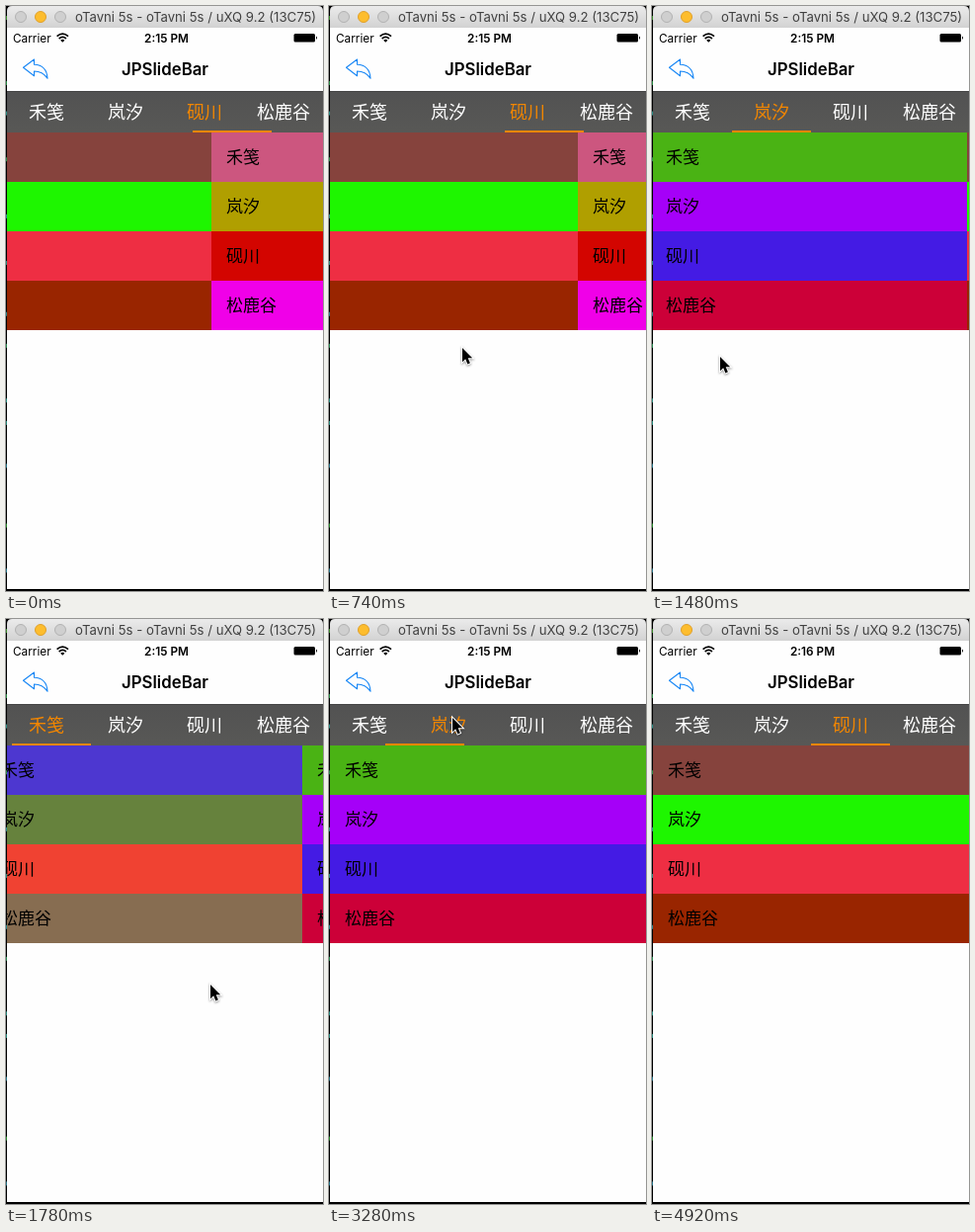
An HTML page that plays this animation: 321x592 px, repeating every 5210 ms.

```html
<!DOCTYPE html>
<html lang="zh-CN">
<head>
<meta charset="utf-8">
<title>JPSlideBar</title>
<style>
  html, body { margin: 0; width: 100%; height: 100%; overflow: hidden; background: #000; }
  svg { display: block; width: 321px; height: 592px; font-family: Inter, "Noto Sans CJK SC", "Noto Sans CJK", sans-serif; }
  .zh { font-family: "Noto Sans CJK SC", "Noto Sans CJK", sans-serif; }
  #tabs text { font-size: 18px; font-weight: 350; text-anchor: middle; fill: #fff; }
  #tabs text.on { fill: #f28600; }
  #pages text { font-size: 17px; }
  #cursor { stroke: #fff; stroke-width: 2; paint-order: stroke; filter: drop-shadow(0 1px 1px #0006); }
</style>
</head>
<body>
<svg viewBox="0 0 321 592">
  <defs>
    <linearGradient id="chrome" x2="0" y2="1">
      <stop stop-color="#ebebeb"/><stop offset="1" stop-color="#d2d2d2"/>
    </linearGradient>
    <linearGradient id="tabFill" x2="0" y2="1">
      <stop stop-color="#525252"/><stop offset="1" stop-color="#585856"/>
    </linearGradient>
  </defs>

  <rect width="321" height="592"/>
  <rect x="1" y="22" width="320" height="568" fill="#fefefe"/>
  <path d="M1 22V5Q1 0 6 0H316Q321 0 321 5V22Z" fill="url(#chrome)"/>
  <g fill="#cfcfcf" stroke="#b2b2b2">
    <circle cx="15" cy="11" r="5.5"/>
    <circle cx="35" cy="11" r="5.5" fill="#fdbd2e" stroke="#e0a02a"/>
    <circle cx="55" cy="11" r="5.5"/>
  </g>
  <text x="70" y="16" font-size="13.2" fill="#414141">oTavni 5s - oTavni 5s / uXQ 9.2 (13C75)</text>

  <text x="7" y="36.5" font-size="11.8">Carrier</text>
  <g fill="none" stroke="#000" stroke-width="1.7">
    <path d="M51.6 30.7Q57.3 25.6 63 30.7M53.7 33Q57.3 29.8 60.9 33"/>
    <path d="M57.3 36.8L55.2 34.7Q57.3 33 59.4 34.7Z" fill="#000" stroke="none"/>
  </g>
  <text id="clock" x="162.5" y="36.5" font-size="11.8" font-weight="600" text-anchor="middle">2:15 PM</text>
  <rect x="291.5" y="28" width="21.5" height="8.5" rx="1.5"/>
  <path d="M314 30.5Q316 32.2 314 34Z"/>

  <path d="M17.5 62.3L28.5 54V59.2C36.5 59.5 41.5 64.5 42 73.2C38.5 68.2 34.5 66 28.5 66V70.7Z"
        fill="none" stroke="#1686f5" stroke-width="1.1" stroke-linejoin="round"/>
  <text x="161" y="70" font-size="16.8" font-weight="600" text-anchor="middle">JPSlideBar</text>

  <g id="pages" class="zh"></g>
  <rect x="1" y="86" width="320" height="42" fill="url(#tabFill)"/>
  <path d="M1 86.5H321" stroke="#444"/>
  <g id="tabs" class="zh"></g>
  <rect id="bar" y="126" width="80" height="2" fill="#f28600"/>

  <path d="M.5 0V592" stroke="#000"/>
  <g id="specks"></g>
  <path id="cursor" d="M0 0V14.2L3.2 11.2 5.4 16.4 7.9 15.3 5.7 10.3H10.2Z"/>
</svg>

<script>
const $ = id => document.getElementById(id);
const LOOP = 5210, FRAME = 149, PAGE = 320, TAB = 80, ROW = 50;
const names = ['禾笺', '岚汐', '砚川', '松鹿谷'];
const palettes = [
  ['#4d37d0', '#66823d', '#f04232', '#876d51'],
  ['#4ab314', '#a500f8', '#441be4', '#cc0038'],
  ['#86433d', '#1ef600', '#ee2e43', '#992500'],
  ['#cc567f', '#b09f00', '#d30500', '#f000e8']
];

$('tabs').innerHTML = names.map((name, i) => `<text x="${41 + TAB * i}" y="113.5">${name}</text>`).join('');
$('pages').innerHTML = palettes.map((colors, p) => colors.map((color, r) =>
  `<rect x="${PAGE * p}" y="${128 + ROW * r}" width="${PAGE}" height="${ROW}" fill="${color}"/>
   <text x="${PAGE * p + 15}" y="${159 + ROW * r}">${names[r]}</text>`).join('')).join('');

let seed = 7;
const random = () => (seed = seed * 16807 % 2147483647) / 2147483647;
for (let y = 10; y < 580; y += 20 + 50 * random())
  $('specks').innerHTML += `<rect y="${y}" width="1" height="4" fill="hsl(${110 + 90 * random()} 55% 35%)"/>`;

// Swipes drag page and bar together; taps switch the page at once and slide the bar.
const swipes = [{ at: -81, by: 1 }, { at: 500, by: -1 }, { at: 843, by: -1 }, { at: 1423, by: -1 }];
const taps = [{ at: 3085, by: 1 }, { at: 3635, by: 1 }];
const glides = [
  { at: 740, x: 69, y: 355 },
  { at: 1330, x: 207, y: 370 },
  { at: 1800, x: 122, y: 100 },
  { at: 3200, x: 188, y: 109 },
  { at: 4030, x: 232, y: 477 }
];

const clamp = u => Math.min(1, Math.max(0, u));
const easeOut = u => 1 - (1 - clamp(u)) ** 3;
const easeInOut = u => (u = clamp(u), u < .5 ? 2 * u * u : 1 - 2 * (1 - u) ** 2);
const jump = u => u >= 0 ? 1 : 0;
const travel = (moves, t, duration, ease) =>
  moves.reduce((sum, move) => sum + move.by * ease((t - move.at) / duration), 0);

function pointerAt(t) {
  return glides.reduce((p, stop) => {
    const u = easeInOut((t - stop.at) / 430);
    return { x: p.x + (stop.x - p.x) * u, y: p.y + (stop.y - p.y) * u };
  }, { x: 135, y: 346 });
}

function draw() {
  const now = performance.now() % LOOP;
  let frame = Math.floor(now / FRAME);
  const start = n => Math.floor(n * FRAME / 10) * 10;
  if (start(frame + 1) <= now) frame++;
  const t = start(frame);

  const swiped = 2 + travel(swipes, t, 600, easeOut);
  const page = swiped + travel(taps, t, 1, jump);
  const barPos = swiped + travel(taps, t, 300, easeInOut);
  const { x, y } = pointerAt(t);

  $('pages').setAttribute('transform', `translate(${1 - Math.round(page * PAGE)})`);
  $('bar').setAttribute('x', Math.round(1 + barPos * TAB));
  [...$('tabs').children].forEach((tab, i) => tab.classList.toggle('on', i === Math.round(page)));
  $('cursor').setAttribute('transform', `translate(${Math.round(x)} ${Math.round(y)})`);
  $('cursor').style.display = t > 280 && t < 4600 ? '' : 'none';
  $('clock').textContent = t < 4900 ? '2:15 PM' : '2:16 PM';
  requestAnimationFrame(draw);
}
draw();
</script>
</body>
</html>
```
